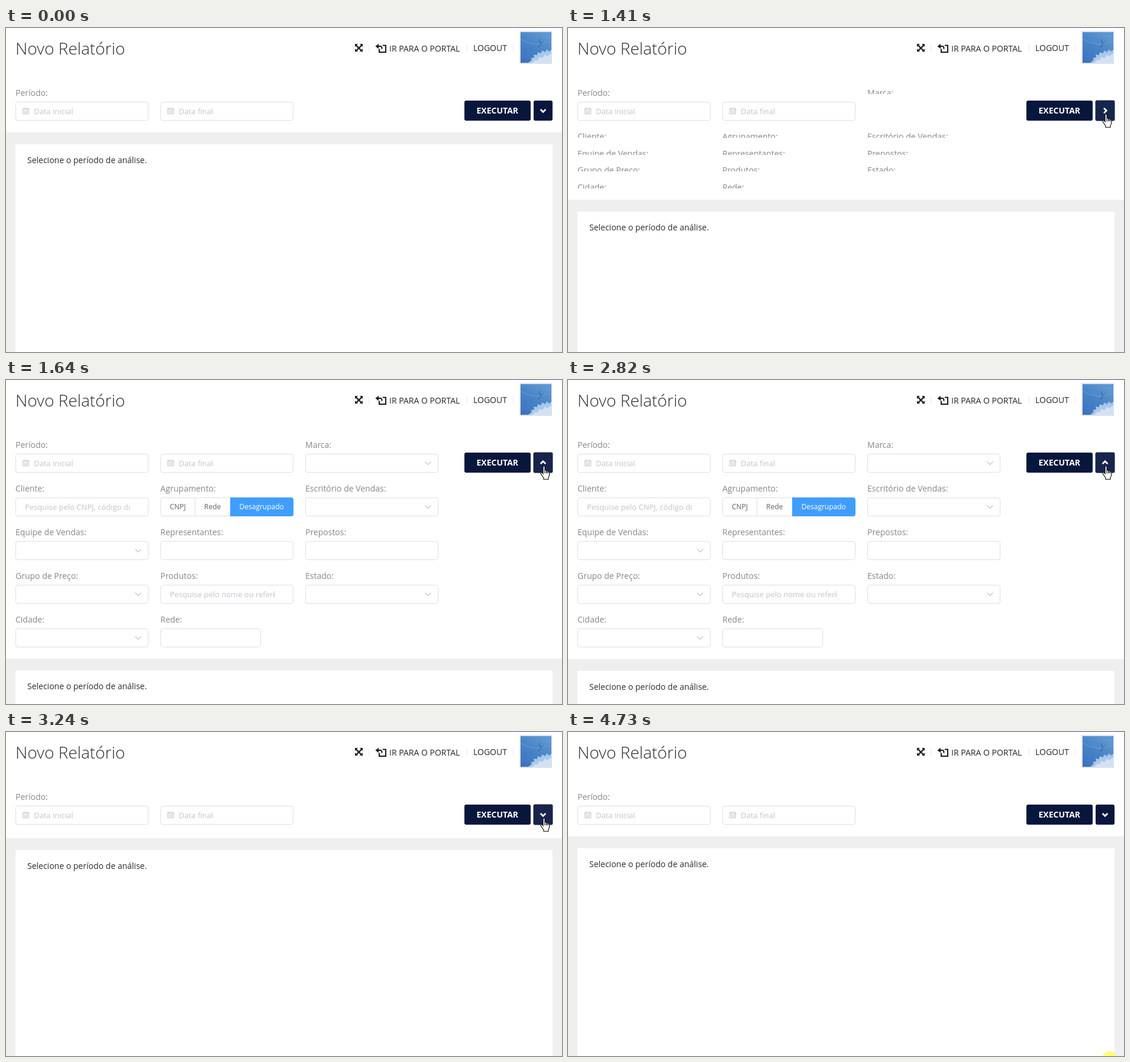
These frames come from a looping animation (940x549 px, 4.77 s). An HTML page with a canvas:

```html
<!DOCTYPE html>
<html lang="pt-BR">
<head>
<meta charset="utf-8">
<title>Novo Relatório</title>
<style>
  html, body { margin: 0; width: 100%; height: 100%; overflow: hidden; background: #fff; }
  canvas { display: block; }
</style>
</head>
<body>
<canvas id="stage" width="940" height="549"></canvas>
<script>
const ctx = document.getElementById('stage').getContext('2d');
const LOOP = 4770, TICK = 30, ROW = 74, COLS = [16, 261, 506];
const NAVY = '#07163d', DARK = '#1d1720', LABEL = '#878787', PALE = '#c0c4cc', BORDER = '#dcdfe6';

// label, column, row, kind, placeholder
const FILTERS = [
  ['Marca:', 2, 0, 'select'],
  ['Cliente:', 0, 1, 'input', 'Pesquise pelo CNPJ, código do cliente'],
  ['Agrupamento:', 1, 1, 'radio'],
  ['Escritório de Vendas:', 2, 1, 'select'],
  ['Equipe de Vendas:', 0, 2, 'select'],
  ['Representantes:', 1, 2, 'input'],
  ['Prepostos:', 2, 2, 'input'],
  ['Grupo de Preço:', 0, 3, 'select'],
  ['Produtos:', 1, 3, 'input', 'Pesquise pelo nome ou referência'],
  ['Estado:', 2, 3, 'select'],
  ['Cidade:', 0, 4, 'select'],
  ['Rede:', 1, 4, 'short']
];

// time, x, y of the pointer
const PATH = [
  [140, 927, 534], [260, 920, 440], [400, 906, 290], [520, 903, 218], [650, 908, 186],
  [780, 908, 160], [810, 908, 160], [840, 908, 153], [930, 908, 145], [4020, 908, 145],
  [4050, 908, 160], [4170, 915, 222], [4290, 923, 320], [4410, 922, 430], [4550, 912, 541]
];
const ARROW = new Path2D('M.5 .5V16.2L4.2 12.7L6.7 18.5L9 17.5L6.5 11.8H11.5Z');
const HAND = new Path2D('M5 14V2.5Q5 .8 6.5 .8T8 2.5V8.5Q8 7.6 9.4 7.6T10.9 9.3Q11 8.6 12.2 8.7T13.4 10.2' +
  'Q13.6 9.6 14.5 9.8T15.7 11.5V15.5Q15.7 18 14 20V23.3H6V21Q4.5 19 3.3 17L1 13.5Q.4 12.2 1.4 11.6Q2.6 11 5 14Z');
const KNUCKLES = new Path2D('M8 8.5V13M10.9 9.3V13M13.4 10.2V13');

const clamp = v => Math.min(1, Math.max(0, v));

function bezier(x1, y1, x2, y2) {
  const at = (a, b, s) => 3 * a * s * (1 - s) ** 2 + 3 * b * s * s * (1 - s) + s ** 3;
  return v => {
    if (v <= 0 || v >= 1) return clamp(v);
    let lo = 0, hi = 1;
    for (let i = 0; i < 24; i++) {
      const mid = (lo + hi) / 2;
      if (at(x1, x2, mid) < v) lo = mid; else hi = mid;
    }
    return at(y1, y2, lo);
  };
}
const ease = bezier(.25, .1, .25, 1), easeInOut = bezier(.42, 0, .58, 1);

function rect(x, y, w, h, color) {
  ctx.fillStyle = color;
  ctx.fillRect(x, y, w, h);
}

function round(x, y, w, h, r, fill, stroke) {
  ctx.beginPath();
  ctx.roundRect(x, y, w, h, r);
  if (fill) { ctx.fillStyle = fill; ctx.fill(); }
  if (stroke) { ctx.strokeStyle = stroke; ctx.lineWidth = 1; ctx.stroke(); }
}

function text(str, x, y, color, size = 14, weight = 400) {
  ctx.font = `${weight} ${size}px "Open Sans", sans-serif`;
  ctx.fillStyle = color;
  ctx.fillText(str, x, y);
}

function shape(d, color, width) {
  const path = new Path2D(d);
  if (width) {
    ctx.strokeStyle = color;
    ctx.lineWidth = width;
    ctx.stroke(path);
  } else {
    ctx.fillStyle = color;
    ctx.fill(path);
  }
}

function clipped(x, y, w, h, draw) {
  ctx.save();
  ctx.beginPath();
  ctx.rect(x, y, w, h);
  ctx.clip();
  draw();
  ctx.restore();
}

function box(x, y, w = 225) {
  round(x + .5, y + .5, w - 1, 31, 3.5, '#fff', BORDER);
}

function dateField(x, hint) {
  box(x, 125);
  ctx.save();
  ctx.translate(x + 12, 135);
  shape('M.5 1.5H10.5V10.5H.5ZM.5 4H10.5M3 0V2.5M8 0V2.5', PALE, 1);
  shape('M2 6.5H9M2 8.5H9', PALE, .9);
  ctx.restore();
  text(hint, x + 31, 146, PALE, 13);
}

function radios(x, y) {
  box(x, y);
  clipped(x + 118, y, 107, 32, () => round(x + 110, y, 115, 32, 4, '#409eff'));
  rect(x + 58, y, 1, 32, BORDER);
  text('CNPJ', x + 16, y + 20, '#606266', 12);
  text('Rede', x + 74, y + 20, '#606266', 12);
  text('Desagrupado', x + 133.5, y + 20, '#fff', 12);
}

function filter([label, col, row, kind, hint], open) {
  const x = COLS[col], height = ROW * open;
  const top = row ? Math.round(157 + height * (row - 1)) : 83;
  clipped(x - 2, top, 232, Math.round(height), () => {
    const y = top + 42;
    text(label, x, top + 32, LABEL);
    if (kind === 'radio') return radios(x, y);
    box(x, y, kind === 'short' ? 170 : 225);
    if (kind === 'select') shape(`M${x + 202.5} ${y + 13.5}l5 5l5 -5`, PALE, 1.1);
    if (hint) clipped(x + 16, y, 178, 32, () => text(hint, x + 16, y + 21, PALE, 13));
  });
}

function avatar() {
  rect(868, 5, 55, 56, '#dfe3ee');
  const sky = ctx.createLinearGradient(870, 59, 905, 7);
  sky.addColorStop(0, '#3c73bd');
  sky.addColorStop(.5, '#4681c6');
  sky.addColorStop(1, '#5f97d1');
  rect(870, 7, 52, 52, sky);
  clipped(870, 7, 52, 52, () => {
    shape('M870 19Q884 27 903 28Q914 23 922 24', '#78a7da', .8);
    shape('M883 59L889 54L887 51L893 50L892 45L898 46L899 41L904 43L907 38L911 41L915 36L917 40L922 37V59Z', '#a9c8ea');
    shape('M890 59L895 54L899 55L901 49L907 51L911 45L915 48L922 43V59Z', '#d2e2f4');
    shape('M902 19L904 27L900 33M904 27L908 23', '#2e5791', .9);
  });
}

function header() {
  text('Novo Relatório', 16, 45, '#2b2b33', 28, 300);
  shape('M592 29.5L601 38.5M601 29.5L592 38.5', DARK, 2.3);
  shape('M590 27h5l-5 5zM603 27v5l-5 -5zM590 40v-5l5 5zM603 40h-5l5 -5z', DARK);
  for (const x of [613, 779, 857]) rect(x, 28, 1, 13, '#ececec');
  shape('M631 35.5V41H642V29.5H637', DARK, 2);
  shape('M629 31H633.5Q635.5 31 635.5 35.5', DARK, 2.2);
  shape('M624.5 31L630 26.8V35.2Z', DARK);
  text('IR PARA O PORTAL', 648, 40, '#26262c');
  text('LOGOUT', 790, 39, '#26262c');
  avatar();
}

function buttons(hover, turn) {
  round(775, 123, 112, 34, 3, NAVY);
  text('EXECUTAR', 795.5, 145, '#fff', 14, 700);
  round(892, 123, 32, 34, 3, NAVY);
  ctx.globalAlpha = hover;
  round(891.5, 122.5, 33, 35, 3, '#17254c');
  ctx.globalAlpha = 1;
  ctx.save();
  ctx.translate(908, 140);
  ctx.rotate(-Math.PI * turn);
  shape('M-4.3 -2L0 2.3L4.3 -2', '#fff', 2.7);
  ctx.restore();
}

function pointer(t) {
  if (t < 140 || t >= 4580) return;
  let i = 1;
  while (i < PATH.length - 1 && PATH[i][0] < t) i++;
  const [t0, x0, y0] = PATH[i - 1], [t1, x1, y1] = PATH[i];
  const k = clamp((t - t0) / (t1 - t0));
  const x = Math.round(x0 + (x1 - x0) * k), y = Math.round(y0 + (y1 - y0) * k);
  const hand = t >= 840 && t < 4080;
  const outline = hand ? HAND : ARROW;
  ctx.save();
  ctx.translate(hand ? x - 5 : x, y);
  ctx.fillStyle = '#fff';
  ctx.strokeStyle = '#000';
  ctx.lineWidth = 1.1;
  ctx.fill(outline);
  ctx.stroke(outline);
  if (hand) ctx.stroke(KNUCKLES);
  ctx.restore();
}

function draw(time) {
  const t = Math.floor(time / TICK) * TICK;
  const span = (start, curve) => curve(clamp((t - start) / 300));
  const open = span(1338, ease) - span(2960, easeInOut);
  const turn = span(1322, ease) - span(2925, ease);
  const hover = span(830, ease) - span(4060, ease);
  const bottom = Math.round(177 + 4 * ROW * open);

  rect(0, 0, 940, 549, '#fff');
  header();
  text('Período:', 16, 115, LABEL);
  dateField(16, 'Data inicial');
  dateField(261, 'Data final');
  if (open > 0) FILTERS.forEach(f => filter(f, open));
  buttons(hover, turn);

  rect(0, bottom, 940, 549 - bottom, '#efefef');
  rect(16, bottom + 20, 908, 549, '#fff');
  text('Selecione o período de análise.', 36, bottom + 52, '#2c2c33');

  pointer(time < 140 ? time : Math.max(t, 140));
  if (time >= 4730) {
    ctx.beginPath();
    ctx.arc(916, 555, 13.5, 0, 2 * Math.PI);
    ctx.fillStyle = '#ffff6e';
    ctx.fill();
  }
}

const begin = performance.now();
function frame() {
  draw((performance.now() - begin) % LOOP);
  requestAnimationFrame(frame);
}
frame();
</script>
</body>
</html>
```
